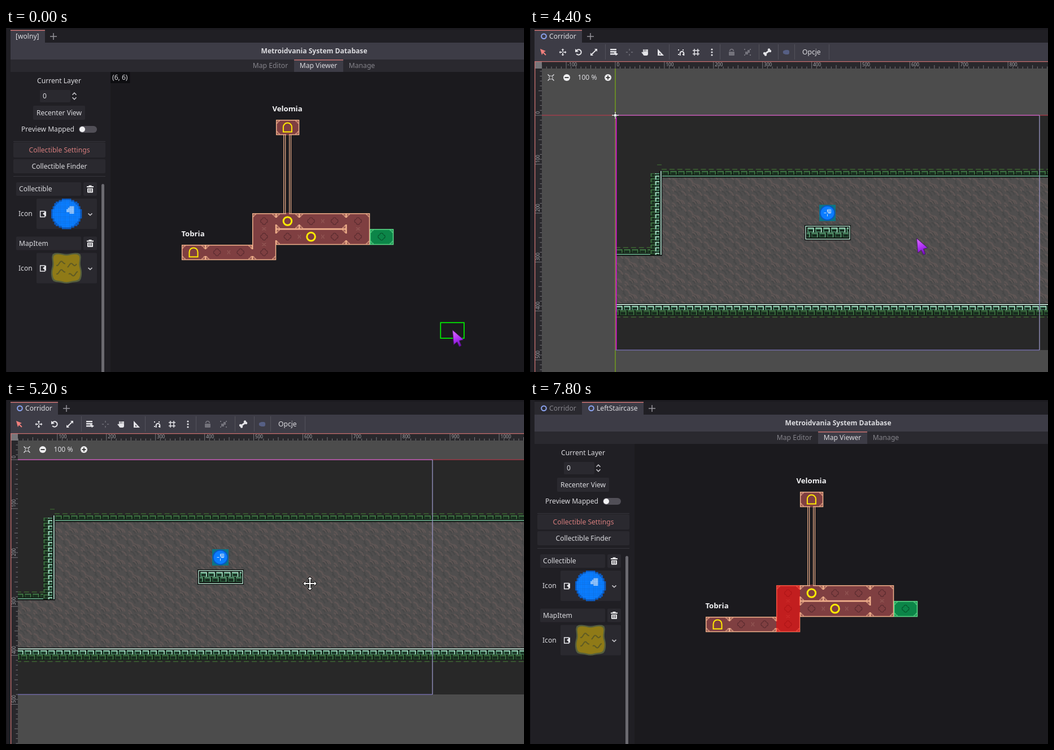
Recreate the animation shown at these times as an HTML page with a canvas. Size 917x611 px, loop 8 s.

```html
<!DOCTYPE html>
<html lang="en">
<head>
<meta charset="utf-8">
<title>Map viewer</title>
<style>
  html, body { margin: 0; width: 100%; height: 100%; overflow: hidden; background: #201f24; }
  canvas { display: block; }
</style>
</head>
<body>
<canvas id="stage" width="917" height="611"></canvas>
<script>
const c = document.getElementById('stage').getContext('2d');
const INK = '#dcdce0', DIM = '#85848b', ACCENT = '#c9706f', BAR = '#3d3c46', STRIP = '#2a292f';
const PEACH = '#f2b28c', ROOM = '#7f3f41', YELLOW = '#ffec00', TURN = 2 * Math.PI;

// Drawing helpers
function box(color, x, y, w, h, r = 0) {
  c.fillStyle = color;
  c.beginPath();
  c.roundRect(x, y, w, h, r);
  c.fill();
}
function line(color, width, ...p) {
  c.strokeStyle = color;
  c.lineWidth = width;
  c.beginPath();
  for (let i = 0; i < p.length; i += 2) c.lineTo(p[i], p[i + 1]);
  c.stroke();
}
function poly(color, ...p) {
  c.fillStyle = color;
  c.beginPath();
  for (let i = 0; i < p.length; i += 2) c.lineTo(p[i], p[i + 1]);
  c.fill();
}
function frame(color, width, x, y, w, h) {
  c.strokeStyle = color;
  c.lineWidth = width;
  c.strokeRect(x, y, w, h);
}
function disc(color, x, y, r) {
  c.fillStyle = color;
  c.beginPath();
  c.arc(x, y, r, 0, TURN);
  c.fill();
}
function ring(color, width, x, y, r, from = 0, to = TURN) {
  c.strokeStyle = color;
  c.lineWidth = width;
  c.beginPath();
  c.arc(x, y, r, from, to);
  c.stroke();
}
function text(s, x, cy, { color = INK, size = 12.1, weight = 400, align = 'left' } = {}) {
  c.font = `${weight} ${size}px "Noto Sans", sans-serif`;
  c.fillStyle = color;
  c.textAlign = align;
  c.fillText(s, x, cy + size * 0.355);
  return c.measureText(s).width;
}
function at(x, y, draw) {
  c.save();
  c.translate(x, y);
  draw();
  c.restore();
}
function quarters(draw) {
  for (let k = 0; k < 4; k++, c.rotate(TURN / 4)) draw();
}

// Pointer glides in ticks of 1/15 s: start, end, x, y
const HOME = [791, 536], GRAB = [685, 373], GRAB_TICK = 68, DROP_TICK = 84;
const GLIDES = [
  [9, 17, 401, 407], [42, 51, 521, -40], [55, 59, 560, 120], [62, 66, ...GRAB], [67, 75, 538, 339],
  [75, 78, 538, 324], [86, 87, 678, -31], [89, 102, 457, 375], [114, 117, 457, -120]
];
function pointer(n) {
  let [x, y] = HOME;
  for (const [start, end, tx, ty] of GLIDES) {
    const u = Math.min(1, Math.max(0, (n - start) / (end - start)));
    x += (tx - x) * u;
    y += (ty - y) * u;
  }
  return [x, y];
}

function tabs(n) {
  box('#201f24', 0, 0, 917, 611);
  box('#17161a', 0, 0, 1, 611);
  box('#1b1a1f', 8, 0, 909, 3);
  const open = n < 27 ? ['[wolny]'] : n < 110 ? ['Corridor'] : ['Corridor', 'LeftStaircase'];
  let x = 8;
  open.forEach((name, i) => {
    const active = i === open.length - 1, pad = n < 27 ? 9 : 26;
    c.font = '12.1px "Noto Sans", sans-serif';
    const w = Math.round(c.measureText(name).width + pad + 10);
    box(active ? BAR : STRIP, x, 3, w, 23);
    if (active) box(ACCENT, x, 3.4, w, 1.6);
    if (pad > 9) ring('#8da5f3', 2, x + 16.5, 14.7, 4.3);
    text(name, x + pad, 14.7, { color: active ? INK : DIM });
    x += w;
  });
  at(x + 15, 15, () => quarters(() => line('#96959b', 1.5, 0, 0, 6, 0)));
}

// Sidebar
function ball(x, y, r, unit) {
  for (let j = -r; j < r; j++) for (let i = -r; i < r; i++) {
    const d = Math.hypot(i + .5, j + .5);
    if (d > r) continue;
    const shine = Math.abs(i - 2) < 3 && Math.abs(j + 3) < 3 && i + j > -4 && !(i < 2 && j > -2);
    box(shine ? '#8cc2ff' : d > r - 1.1 ? '#0b5cc4' : '#0a7dff', x + i * unit, y + j * unit, unit + .3, unit + .3);
  }
}
function scrap(x, y) {
  const outline = r => Array.from({ length: 48 }, (_, k) => {
    const a = k * TURN / 48, s = (r + 1.2 * Math.sin(5 * a)) / Math.hypot(Math.cos(a) ** 4, Math.sin(a) ** 4) ** .25;
    return [x + s * Math.cos(a), y + s * Math.sin(a)];
  }).flat();
  poly('#565f3d', ...outline(26));
  poly('#8f7a17', ...outline(23.5));
  for (const [dx, dy] of [[-18, -7], [2, -4], [-18, 8], [4, 13]])
    line('#5f5b24', 2, ...Array.from({ length: 9 }, (_, k) => [x + dx + k * 2, y + dy + 3 * Math.sin(k * .9 + dx) - k * .5]).flat());
}
function chevron(x, y, h) {
  line('#c4c3c8', 1.6, x - 3.5, y - h, x, y + h, x + 3.5, y - h);
}
function item(name) {
  box(STRIP, 18, 274, 115, 24, 2);
  text(name, 23, 286);
  box(STRIP, 137, 274, 24, 24, 2);
  box('#eeeef0', 143, 281, 12, 2);
  box('#eeeef0', 146.5, 279.5, 5, 2);
  box('#eeeef0', 144, 284.5, 10, 8, 1);
  for (const x of [146, 148.5, 151]) box(STRIP, x, 285.5, 1, 5.5);
  text('Icon', 22, 330);
  box(STRIP, 54, 303, 107, 54, 2);
  frame('#e6e6ea', 1.5, 60.7, 325.5, 8, 10);
  poly('#e6e6ea', 71, 325, 65, 330, 71, 335);
  chevron(149, 331, 1.6);
}
function button(s, x, y, w, h, color) {
  box(STRIP, x, y, w, h, 2);
  text(s, x + w / 2, y + h / 2 + .3, { align: 'center', color });
}
function sidebar() {
  text('Current Layer', 94, 94, { align: 'center' });
  box(STRIP, 60, 110, 54, 22, 2);
  text('0', 65, 121);
  chevron(121, 125, 1.8);
  chevron(121, 117, -1.8);
  button('Recenter View', 48, 138, 92, 25);
  text('Preview Mapped', 27, 180);
  box('#514f57', 129, 174, 32, 12, 6);
  disc('#f2f2f4', 135, 180, 5);
  for (const y of [201, 263]) box('#37363c', 13, y, 163, 1);
  button('Collectible Settings', 13, 203, 163, 27, '#d67d7d');
  button('Collectible Finder', 13, 233, 163, 25);
  item('Collectible');
  at(0, 96.5, () => item('MapItem'));
  ball(107, 330, 10, 2.7);
  scrap(107, 426.5);
  box('#6b6a70', 169, 277, 5, 340, 2.5);
}

// Map: rooms as column, row, width, height
const CW = 41.6, CH = 27.72;
const gx = i => Math.round(519.2 + CW * i), gy = j => Math.round(356.8 + CH * j);
const centre = (i, j) => [519.2 + CW * (i + .5), 356.8 + CH * (j + .5)];
const CORRIDOR = [-4, 1, 2, 1], STAIRCASE = [-2, -1, 1, 3], EXIT = [3, 0, 1, 1];
const ROOMS = [[-1, -7, 1, 1], [-5, 1, 1, 1], CORRIDOR, STAIRCASE, [-1, -1, 1, 1], [0, -1, 2, 1], [2, -1, 1, 2], [-1, 0, 3, 1], EXIT];
const FILES = new Map([[CORRIDOR, 'Corridor.tscn'], [STAIRCASE, 'LeftStaircase.tscn']]);
const ICONS = { '-1,-7': arch, '-5,1': arch, '-1,-1': goal, '0,0': goal };
const roomAt = (i, j) => ROOMS.find(([a, b, w, h]) => i >= a && i < a + w && j >= b && j < b + h);

function arch() {
  c.strokeStyle = YELLOW;
  c.lineWidth = 2;
  c.beginPath();
  c.moveTo(-7.5, 8);
  c.arc(0, -.5, 7.5, Math.PI, 0);
  c.lineTo(7.5, 8);
  c.closePath();
  c.stroke();
}
function goal() {
  ring(YELLOW, 3, 0, 0, 7.3);
}
function flower(color) {
  quarters(() => ring(color, 1.2, 3.2, 0, 3, -1.5, 1.5));
}
function knot() {
  for (const s of [-1, 1]) line('#9c625d', 1, 2.5 * s, -3.5, s, -1, s, 1, 2.5 * s, 3.5);
}
function shell(room) {
  const [i, j, w, h] = room, x = gx(i), y = gy(j), W = gx(i + w) - x, H = gy(j + h) - y;
  const edge = room === EXIT ? '#5fd98a' : PEACH;
  box(room === EXIT ? '#0c8548' : ROOM, x, y, W, H);
  frame(edge, 1.5, x + .7, y + .7, W - 1.2, H - 1.2);
  for (const sx of [1, -1]) for (const sy of [1, -1]) at(x + (sx < 0 && W), y + (sy < 0 && H), () => {
    c.scale(sx, sy);
    line(edge, 1, 6, 1, 6, 3, 3, 3, 3, 6, 1, 6);
  });
}
function furnish(room) {
  const [a, b, w, h] = room;
  for (let i = a; i < a + w; i++) for (let j = b; j < b + h; j++) {
    const beside = roomAt(i - 1, j);
    if (beside && beside !== room && room !== EXIT) box(ROOM, gx(i) - 2, gy(j) + 8, 4, 12);
    at(...centre(i, j), ICONS[[i, j]] || (() => flower(room === EXIT ? '#07592f' : '#5d2d31')));
    if (i > a) at(...centre(i - .5, j), knot);
    if (j > b) at(...centre(i, j - .5), () => { c.rotate(TURN / 4); knot(); });
  }
}
function map(n, mx, my) {
  box(BAR, 8, 26, 909, 30);
  text('Metroidvania System Database', 545.5, 41, { weight: 700, align: 'center' });
  box(STRIP, 8, 56, 909, 22);
  box(BAR, 510, 56, 87, 22);
  box(ACCENT, 510, 56, 87, 1.5);
  ['Map Editor', 'Map Viewer', 'Manage'].forEach((s, k) =>
    text(s, 468 + 81 * k + k % 2 * 4, 67, { align: 'center', color: k === 1 ? INK : DIM }));
  box('#1b1a1e', 185, 78, 732, 533);
  sidebar();

  for (const s of [-1, 1]) for (const d of [3.5, 6.4]) line(PEACH, 1.2, 498.1 + s * d, 189, 498.1 + s * d, 330);
  ROOMS.forEach(shell);
  for (const y of [187, 328]) box(ROOM, 496, y, 5, 3);
  ROOMS.forEach(furnish);
  const name = { weight: 600, size: 13.2, align: 'center', color: '#f4f4f6' };
  text('Velomia', 498, 143, name);
  text('Tobria', 331, 365.5, name);

  const hover = mx > 185 && my > 78;
  const i = Math.floor((mx - 519.2) / CW), j = Math.floor((my - 356.8) / CH);
  if (hover) frame('#00f400', 1.7, gx(i) + .3, gy(j) + .3, CW, CH);
  if (n >= 28) {
    const [a, b, w, h] = n < 110 ? CORRIDOR : STAIRCASE;
    box('rgba(255,0,0,.52)', gx(a), gy(b), gx(a + w) - gx(a), gy(b + h) - gy(b));
  }
  if (hover) {
    const label = `(${i}, ${j}) ${FILES.get(roomAt(i, j)) || ''}`.trim();
    c.font = '12.1px "Noto Sans", sans-serif';
    box('#0e0e11', 185, 78, c.measureText(label).width + 7, 20);
    text(label, 188, 88);
  }
}

// Scene editor
let seed = 11;
const rnd = () => (seed = seed * 16807 % 2147483647) / 2147483647;
const stone = (() => {
  const tile = document.createElement('canvas'), g = tile.getContext('2d'), size = tile.width = tile.height = 28;
  g.fillStyle = '#504e4e';
  g.fillRect(0, 0, size, size);
  for (let k = 0; k < 14; k++) {
    const x = rnd() * size, y = rnd() * size, d = 4 + rnd() * 5;
    g.strokeStyle = k % 2 ? '#5f5655' : '#484848';
    g.lineWidth = 2 + rnd();
    for (const ox of [-size, 0, size]) for (const oy of [-size, 0, size]) {
      g.beginPath();
      g.moveTo(x + ox, y + oy);
      g.lineTo(x + ox + d * .6, y + oy + d * .3);
      g.lineTo(x + ox + d, y + oy + d);
      g.stroke();
    }
  }
  return c.createPattern(tile, 'repeat');
})();

const MINT = ['#b2e6cf', '#4c8a6a'], GREEN = ['#63a67c', '#2c5a3e'], MOSS = ['#437a47', '#27482c'];
function bricks(x, y, w, h, [edge, fill], shift = 0, step = 13.9) {
  c.save();
  c.beginPath();
  c.rect(x, y, w, h);
  c.clip();
  box('#111c14', x, y, w, h);
  for (let k = x - shift; k < x + w; k += step) {
    box(fill, k + 1, y + 1, step - 2, h - 2);
    box('#16281d', k + 3, y + h * .4, step - 6, h * .35);
    line(edge, 1.4, k + 1.5, y + 1.2, k + step - 2, y + 1.2, k + step - 2, y + h - 1);
  }
  c.restore();
}
function dashes(x, y, w) {
  c.setLineDash([9, 4.9]);
  line('#3d6632', 1.3, x, y, x + w, y);
  c.setLineDash([]);
}
function ledge(x, y, w) {
  dashes(x, y, w);
  bricks(x, y + 2.5, w, 8, MOSS);
  box('#050806', x, y + 10.5, w, 4);
  box('#7cc8a2', x, y + 11.3, w, 1.5);
}
function level() {
  const far = 1502;
  box('#282828', 0, 0, far, 417);
  c.fillStyle = stone;
  c.fillRect(82, 109, far - 82, 227);
  c.fillRect(0, 248, 83, 88);
  ledge(82, 96, far);
  ledge(0, 235, 83);
  at(62, 248, () => {
    c.rotate(-TURN / 4);
    bricks(0, 0, 145, 9, MOSS, 0, 9.8);
    bricks(0, 8, 145, 9, MINT, 5, 9.8);
  });
  box('#06090a', 79, 99, 4, 150);
  box('#c0eedb', 80, 99, 1.7, 149);
  dashes(74, 88, 8);
  box('#060908', 0, 334, far, 4);
  box('#d4f3e6', 0, 335.3, far, 1.7);
  bricks(0, 338, far, 9, MINT);
  bricks(0, 346, far, 10, MOSS, 7);
  dashes(0, 358.5, far);
  box('#060908', 335, 195, 82, 27);
  frame('#c0eedb', 1.4, 337, 197, 78, 23);
  bricks(339, 199, 74, 10, MINT);
  bricks(339, 208, 74, 10, GREEN, 7);
  box('#0c7584', 361, 159, 29, 29);
  at(375.5, 173.5, () => {
    disc('#0b55c0', 0, 0, 13.8);
    disc('#0a7dff', 0, 0, 11.8);
    box('#6fb0f8', 0, -7, 7, 8, 2);
    quarters(() => line('#d8e6f4', 1, 2, 0, 6, 0));
  });
}
function ruler(o, length, sign) {
  for (let k = -70; k < 130; k++) {
    const p = o + k * 8.69, size = k % 5 ? 3.5 : k % 10 ? 6 : 12;
    if (p < 0 || p > length) continue;
    line('#77767b', 1, p, 12 - size, p, 12);
    if (k % 10 === 0) text(String(k * 10 * sign || 0), p + 2.5, 5.5, { size: 8.2, color: '#a5a4a9' });
  }
}
function star(color, r, gap, head, width) {
  quarters(() => {
    line(color, width, 0, gap, 0, r - head);
    poly(color, -head, r - head, head, r - head, 0, r);
  });
}

// Toolbar icons, each around its own centre
const LIT = '#e4e4e8', FAINT = '#73727b';
const TOOLS = {
  23: () => { poly('#f07f7c', -5, -6, 5, -2, 1, 0, -2, 5); line('#f07f7c', 2, 0, 0, 5, 5); },
  58: () => star(LIT, 6.5, 1, 2.5, 1.6),
  86: () => { ring(LIT, 2, 0, 0, 4.7, -2.4, 2.5); poly(LIT, -6, -6, -6, 0, 0, -1); },
  113: () => { for (const s of [-1, 1]) { line(LIT, 2, 0, 0, 4 * s, -4 * s); poly(LIT, 6 * s, -6 * s, s, -6 * s, 6 * s, -s); } },
  148: () => { for (const y of [-6, -2, 2]) box(LIT, -6, y, 11, 2.5); poly(LIT, 0, -1, 8, 3, 4, 6); },
  176: () => star(FAINT, 6.5, 3, 1, 1.5),
  204: () => { box(LIT, -4, -1, 9, 7, 3); for (const x of [-3, -.5, 2, 4]) line(LIT, 1.7, x, -5, x, 2); line(LIT, 2, -6, 0, -2, 4); },
  231: () => { poly(LIT, -5, -6, 6, 6, -5, 6); poly(BAR, -2, 1, 1, 4, -2, 4); },
  267: () => { ring(LIT, 2, 2, 2, 3.3, Math.PI, 0); for (const x of [-1.3, 5.3]) line(LIT, 2, x, 2, x, 6); quarters(() => box(LIT, -5, -5, 2, 2)); },
  294: () => quarters(() => line(LIT, 1.5, -6, 3, 6, 3)),
  322: () => { for (const y of [-5, 0, 5]) disc(LIT, 0, y, 1.6); },
  357: () => { box(FAINT, -5, -1, 10, 7, 1); ring(FAINT, 1.8, 0, -2, 3.3, Math.PI, 0); },
  385: () => { quarters(() => box(FAINT, -6, -6, 2, 2)); box(FAINT, -4, -1, 5, 5); box(FAINT, 0, -4, 4, 5); },
  420: () => { line(LIT, 3, -4, 3, 4, -3); for (const s of [-1, 1]) { disc(LIT, 5 * s, -2 * s, 2.2); disc(LIT, 3 * s, -4.5 * s, 2.2); } },
  454: () => { box('#565f84', -4, -4, 9, 8, 3); disc('#565f84', -3, 0, 3.2); }
};
function toolbar() {
  box(BAR, 8, 26, 909, 33);
  for (const x of [133, 246, 336, 405, 439, 468, 529]) box('#53525b', x, 29, 1, 27);
  for (const x in TOOLS) at(+x, 43, TOOLS[x]);
  text('Opcje', 482, 42.7);
}
function scene(ox, oy) {
  toolbar();
  box('#4c4c4c', 8, 59, 909, 552);
  c.save();
  c.beginPath();
  c.rect(21, 72, 896, 539);
  c.clip();
  at(ox, oy, () => {
    level();
    line('#c8364a', 1.2, -917, 0, 917, 0);
    line('#76a31a', 1.4, 0, -611, 0, 611);
    line('#b35cb8', 1.4, 0, 0, 751, 0);
    line('#d219cf', 2, 1.5, 0, 1.5, 417);
    line('#706aa4', 1.3, 0, 417, 751, 417);
    line('#9a97c6', 1.3, 751, 0, 751, 417);
    disc('#333', 0, 0, 4);
    disc('#f0f0f0', 0, 0, 2.6);
    star('#f0f0f0', 6, 3, 1, 1.4);
  });
  at(37, 88, () => {
    star(LIT, 4, 2.5, 1.5, 1.2);
    c.rotate(TURN / 8);
    star(LIT, 8, 2.5, 1, 1.4);
  });
  for (const x of [65, 138]) {
    disc('#f0f0f2', x, 88, 6);
    line('#333', 1.8, x - 3.5, 88, x + 3.5, 88);
  }
  line('#333', 1.8, 138, 84.5, 138, 91.5);
  text('100 %', 101.5, 88, { align: 'center' });
  c.restore();

  box('#29282c', 9, 60, 908, 12);
  box('#29282c', 9, 60, 12, 551);
  at(9, 60, () => ruler(ox - 9, 908, 1));
  at(9, 611, () => {
    c.rotate(-TURN / 4);
    ruler(611 - oy, 538, -1);
  });
  box('#77767a', 9, 60, 12, 12);
  line(ACCENT, 1.3, 917, 59.7, 8.7, 59.7, 8.7, 611);
}

// Pointers
function arrow() {
  const g = c.createLinearGradient(0, 4, 12, 30);
  g.addColorStop(0, '#d766ff');
  g.addColorStop(.5, '#ad30f4');
  g.addColorStop(1, '#6a0cb0');
  poly(g, -.5, .5, 19, 17.5, 11.5, 19.5, 15, 28, 11.5, 30, 7.5, 21.5, 1.5, 26.5);
  c.closePath();
  c.strokeStyle = '#4a1468';
  c.lineWidth = 1;
  c.stroke();
}
function cross() {
  star('#111', 13, 0, 5, 4.5);
  star('#fff', 11.5, 0, 3.5, 2);
}

function draw(now) {
  const n = Math.floor((now % 8000 + 4) * .015) % 120;
  const [mx, my] = pointer(n);
  const editing = n >= 56 && n < 87, dragging = n >= GRAB_TICK && n < DROP_TICK;
  tabs(n);
  if (editing) {
    const pulled = n >= GRAB_TICK;
    scene(151 + (pulled && mx - GRAB[0]), 155 + (pulled && my - GRAB[1]));
  } else map(n, mx, my);
  if (dragging) at(mx, my + 2, cross);
  else if (my > -31) at(mx, my, arrow);
  requestAnimationFrame(draw);
}
requestAnimationFrame(draw);
</script>
</body>
</html>
```
